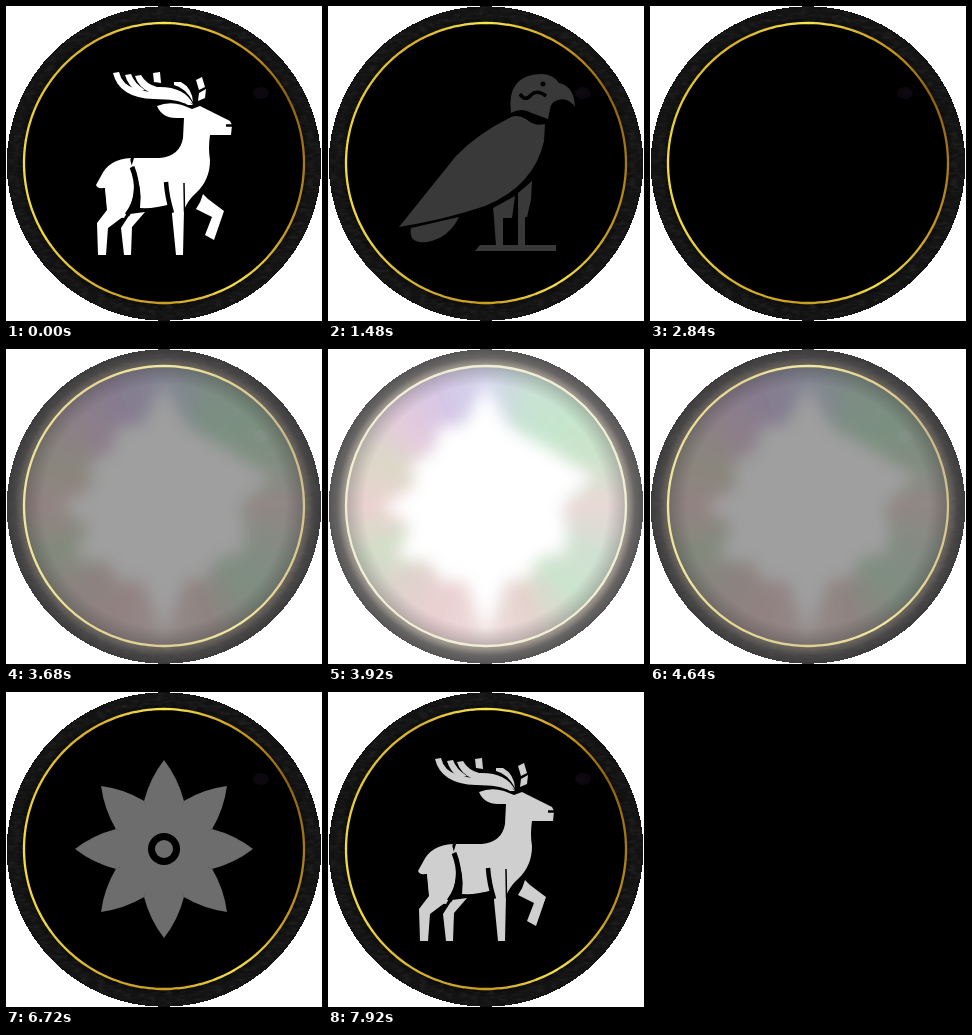
An HTML page that plays this animation: 316x315 px, repeating every 8.04 s.

```html
<!DOCTYPE html>
<html lang="en">
<head>
<meta charset="utf-8">
<title>Medallion</title>
<style>
html, body { margin: 0; width: 100%; height: 100%; overflow: hidden; background: #fff; }
svg { display: block; width: 100vw; height: 100vh; }
</style>
</head>
<body>
<svg viewBox="0 0 316 315">
  <defs>
    <radialGradient id="rim" gradientUnits="userSpaceOnUse" cx="158" cy="157.5" r="157">
      <stop offset=".89" stop-color="#0a0a0a"/>
      <stop offset=".94" stop-color="#131313"/>
      <stop offset="1" stop-color="#121212"/>
    </radialGradient>
    <radialGradient id="halo" gradientUnits="userSpaceOnUse" cx="158" cy="157.5" r="157">
      <stop offset=".86" stop-color="#b6b2aa"/>
      <stop offset=".91" stop-color="#969088"/>
      <stop offset=".95" stop-color="#686565"/>
      <stop offset="1" stop-color="#565454"/>
    </radialGradient>
    <radialGradient id="shade" gradientUnits="userSpaceOnUse" cx="158" cy="157" r="141">
      <stop offset=".86" stop-color="#555" stop-opacity="0"/>
      <stop offset="1" stop-color="#555" stop-opacity=".35"/>
    </radialGradient>
    <filter id="grain" x="0" y="0" width="1" height="1">
      <feTurbulence type="fractalNoise" baseFrequency=".12 .3" numOctaves="3" seed="4"/>
      <feColorMatrix values="0 0 0 0 .3  0 0 0 0 .3  0 0 0 0 .3  .9 0 0 0 -.36"/>
      <feComposite in2="SourceAlpha" operator="in"/>
    </filter>
    <filter id="soft" x="-.2" y="-.2" width="1.4" height="1.4"><feGaussianBlur stdDeviation="8"/></filter>
    <clipPath id="inner"><circle cx="158" cy="157" r="140.5"/></clipPath>
  </defs>

  <circle cx="158" cy="157.5" r="157.3" fill="url(#rim)" shape-rendering="crispEdges"/>
  <circle cx="158" cy="157.5" r="156.5" filter="url(#grain)" opacity=".25"/>
  <circle cx="158" cy="157" r="140.5"/>
  <ellipse cx="255" cy="87" rx="8" ry="6" fill="#0d070f"/>
  <g id="ring" fill="none" stroke-width="2.3"></g>

  <g id="light">
    <circle cx="158" cy="157.5" r="157.3" fill="url(#halo)" shape-rendering="crispEdges"/>
    <g clip-path="url(#inner)">
      <g id="hues"></g>
      <circle cx="158" cy="157" r="141" fill="url(#shade)"/>
      <path id="burst" fill="#fff" filter="url(#soft)"/>
    </g>
    <circle cx="158" cy="157" r="140" fill="none" stroke="#f0eed4" stroke-width="2.3"/>
  </g>

  <g id="stag" fill="#fff">
    <path d="M151 100Q163 95 176 99L186 103L194 100L224 115L226 119L225 129H204Q202 142 204 154Q204 174 190 187Q182 194 178 204L177 249H170L165 198Q148 203 134 202Q137 180 127 162Q123 153 125 152Q103 153 95 170L90 179Q92 183 97 182L99 182L101 204L91 217L92 249H100L102 222L118 210Q131 187 125 162L128 152H154Q174 150 177 132L178 112H170Q156 112 151 100Z"/>
    <path d="M102 210L118 212Q133 190 126 160L116 156L99 180Z"/>
    <path d="M124 208L139 206L126 221L125 249H118L115 222Z"/>
    <path d="M197 188L202 193L218 205L208 234L199 229L206 211L190 203Q195 196 197 188Z"/>
    <g fill="none" stroke="#000">
      <path d="M126 161Q137 188 121 209" stroke-width="5"/>
      <path d="M160 176Q161 191 166 207" stroke-width="4.500"/>
      <path d="M178 177L178.500 206" stroke-width="1.500"/>
      <path d="M220 119.500H227" stroke-width="2.500"/>
    </g>
    <path d="M107 67L113 66Q116 79 130 83Q144 87 160 87Q178 88 187 99L182 99Q172 93 148 93Q113 92 107 67Z"/>
    <path d="M119 69L125 68Q128 77 139 84L132 86Q122 80 119 69Z"/>
    <path d="M129 70L135 69Q140 78 151 81Q178 80 187 98L178 93Q165 86 145 87Q132 81 129 70Z"/>
    <path d="M147 67L154 66L155 77L148 76Z"/>
    <path d="M168 76L175 76Q186 82 187 96Q180 82 168 79Z"/>
    <path d="M190 74L196 71L199 81L193 84Z"/>
    <path d="M193 87L200 83L199 92L192 95Z"/>
  </g>

  <g id="bird" fill="#fff">
    <path d="M183 107Q178 69 213 68Q225 68 231 77Q246 80 247 101Q240 91 230 94Q223 96 222 103L220 113Q206 108 199 105Q191 102 183 107Z"/>
    <path d="M183 111Q149 128 128 150L71 221Q119 213 157 200Q206 180 216 135L217 118Q207 121 198 113Q190 108 183 111Z"/>
    <path d="M83 222L131 211Q121 232 99 236Q80 238 83 222Z"/>
    <path d="M165 202L187 190L184 212H175V240H168L166 212Z"/>
    <path d="M190 187L204 175L203 194L199 211H197V240H190Z"/>
    <path d="M152 239H228V245H147Z"/>
    <circle cx="215" cy="78" r="2.500" fill="#000"/>
    <path d="M192 88Q197 96 203 89Q209 83 218 90" fill="none" stroke="#000" stroke-width="3.500"/>
  </g>

  <g id="flower" fill="#fff" transform="translate(158 157)"></g>
</svg>
<script>
const $ = id => document.getElementById(id);
const LOOP = 8040, STEP = 120;

// Each picture: start of fade in, start of fade out.
const shows = {
  stag: [7560, 8440],
  bird: [1480, 2360],
  light: [3440, 4520],
  flower: [5600, 6480]
};

// Colours around the circle, clockwise from the right.
const gold = ['#a67a18', '#c79a20', '#f7e24c', '#c99c1e', '#d9b52a', '#f0d83c',
  '#f2dc40', '#e6c834', '#d9b028', '#f8e850', '#d0a020', '#8f6212'];
const pastel = ['#e9d9d6', '#d2e0d2', '#cce4ce', '#e4d3cd', '#eedcdc', '#ebd0d2', '#dfd2cc', '#d2dec8',
  '#ead2d0', '#dcd8c8', '#e3cbdc', '#d6c6e6', '#d2d4ec', '#c8e2d4', '#c6e6cc', '#cee2cc'];

const polar = (deg, r) => {
  const a = deg * Math.PI / 180;
  return [158 + r * Math.cos(a), 157 + r * Math.sin(a)].map(v => v.toFixed(2)).join(' ');
};

const channels = hex => [1, 3, 5].map(i => parseInt(hex.slice(i, i + 2), 16));

function colourAt(list, deg) {
  const pos = deg / 360 * list.length, i = Math.floor(pos);
  const a = channels(list[i % list.length]), b = channels(list[(i + 1) % list.length]);
  return `rgb(${a.map((v, k) => Math.round(v + (b[k] - v) * (pos - i)))})`;
}

function sweep(list, part) {
  let out = '';
  for (let a = 0; a < 360; a += 3) out += part(a, colourAt(list, a + 1.5));
  return out;
}

function buildFlower() {
  let petals = '<circle r="46"/>';
  for (let i = 0; i < 8; i++) {
    petals += `<path transform="rotate(${i * 45})" d="M0 0L-20 -48Q-14 -71 0 -89Q14 -71 20 -48Z"/>`;
  }
  $('flower').innerHTML = petals + '<circle r="16" fill="#000"/><circle r="9"/>';
}

function buildRound() {
  $('ring').innerHTML = sweep(gold, (a, c) =>
    `<path stroke="${c}" d="M${polar(a, 140)}A140 140 0 0 1 ${polar(a + 3.2, 140)}"/>`);
  $('hues').innerHTML = sweep(pastel, (a, c) =>
    `<path fill="${c}" d="M158 157L${polar(a, 150)}L${polar(a + 3.6, 150)}Z"/>`);

  const reach = [76, 84, 92, 74, 84, 78, 130, 78, 88, 80, 104, 78,
    104, 74, 86, 76, 92, 84, 122, 84, 80, 84, 92, 112];
  $('burst').setAttribute('d', 'M' + reach.map((r, i) => polar(i * 15, r)).join('L') + 'Z');
}

function level(t, [from, to]) {
  if (t < from) t += LOOP;
  const up = Math.floor((t - from) / STEP) + 1;
  const down = Math.floor((t - to) / STEP) + 1;
  const n = Math.max(0, Math.min(up, 5 - Math.max(0, down), 5));
  return (n / 5) ** .93;
}

function draw(t) {
  for (const id in shows) $(id).setAttribute('opacity', level(t, shows[id]));
}

buildFlower();
buildRound();
draw(0);
const start = performance.now();
requestAnimationFrame(function tick(now) {
  draw(Math.max(0, now - start) % LOOP);
  requestAnimationFrame(tick);
});
</script>
</body>
</html>
```
